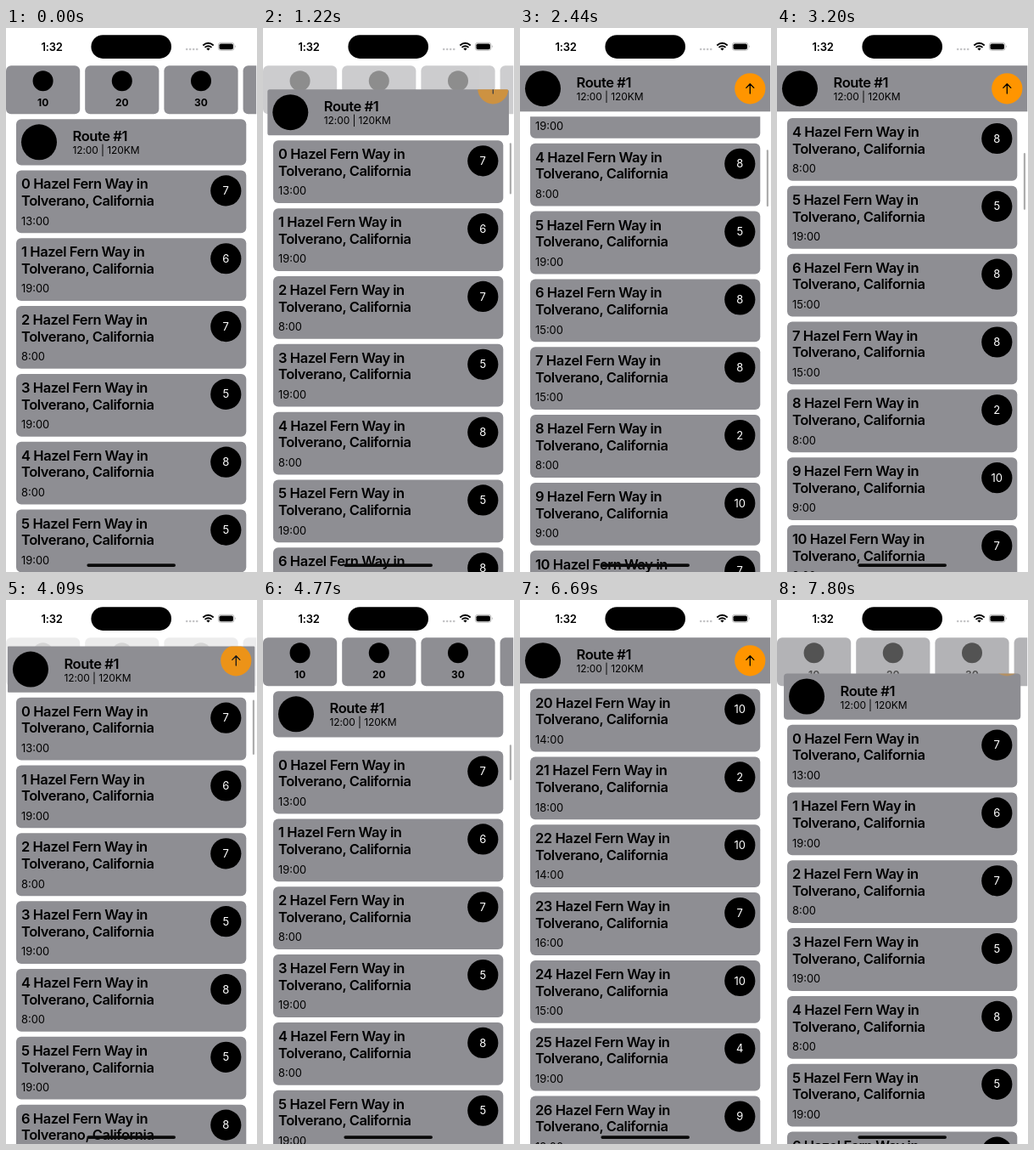
These frames come from a looping animation (296 by 640 pixels, 7890 ms). An HTML page:

```html
<!DOCTYPE html>
<html lang="en">
<head>
<meta charset="utf-8">
<style>
html, body { margin: 0; width: 100%; height: 100%; overflow: hidden; background: #fff; }
svg { display: block; font-family: Inter, "Liberation Sans", sans-serif; }
.card { fill: #8e8e93; }
.title { font-size: 16.5px; font-weight: 600; letter-spacing: -.42px; }
.time { font-size: 12.9px; }
.sub { font-size: 12px; letter-spacing: -.1px; }
.num { font-size: 13px; fill: #fff; text-anchor: middle; }
.tag { font-size: 12px; font-weight: 700; text-anchor: middle; }
</style>
</head>
<body>
<svg width="296" height="640" viewBox="0 0 296 640">
  <clipPath id="listClip"><rect y="104.3" width="296" height="536"/></clipPath>
  <clipPath id="headClip"><rect id="headMask" height="54.1"/></clipPath>

  <svg width="295.2" height="640"><g id="carousel"></g></svg>
  <g clip-path="url(#listClip)"><g id="list"></g></g>

  <rect id="headBox" class="card" height="54.1"/>
  <g id="headText">
    <circle cx="27" cy="27" r="21"/>
    <text class="title" x="66.5" y="26">Route #1</text>
    <text class="sub" x="66.5" y="41.2">12:00 | 120KM</text>
  </g>
  <g clip-path="url(#headClip)">
    <g id="button">
      <circle cx="271.3" cy="71.3" r="18.1" fill="#ff9500"/>
      <path d="M271.3 77V66M266.8 70.4L271.3 65.8L275.8 70.4" fill="none" stroke="#000" stroke-width="1.3" stroke-linecap="round" stroke-linejoin="round"/>
    </g>
  </g>
  <rect id="bar" x="290.8" width="2.2" rx="1.1" fill="#000" fill-opacity=".32"/>

  <!-- status bar and home indicator -->
  <text x="54" y="26.5" font-size="13" font-weight="600" text-anchor="middle" letter-spacing="-.2">1:32</text>
  <rect x="100.4" y="8.3" width="94.6" height="27.6" rx="13.8"/>
  <g fill="#c4c4c6" id="dots"></g>
  <g fill="none" stroke="#000" stroke-width="1.9">
    <path d="M232.3 20.4Q238.5 15.2 244.7 20.4M234.5 22.9Q238.5 19.5 242.5 22.9"/>
    <path d="M236.3 24.2Q238.5 22.6 240.7 24.2L238.5 26.6Z" fill="#000" stroke="none"/>
    <rect x="250.4" y="17.3" width="18.6" height="9" rx="2.8" stroke="#aaa" stroke-width=".8"/>
  </g>
  <rect x="251.5" y="18.4" width="16.4" height="6.8" rx="1.8"/>
  <path d="M270.2 20.3q1.6 1.5 0 3z" fill="#aaa"/>
  <rect x="95.4" y="630.2" width="104.6" height="3.8" rx="1.9" fill="#0a0a0a"/>
</svg>
<script>
const LOOP = 7890, PITCH = 79.83, TRAVEL = 63.1, HEAD_TOP = 107.3, LIST_TOP = 167.4;
const $ = id => document.getElementById(id);
const clamp = v => Math.min(1, Math.max(0, v));
const set = (el, attrs) => { for (const k in attrs) el.setAttribute(k, attrs[k]); };
const repeat = (n, make) => Array.from({ length: n }, (_, i) => make(i)).join('');

// the first stops are given, later ones are drawn at random
const firstBadges = [7, 6, 7, 5, 8, 5, 8, 8, 2, 10, 7];
const firstHours = [13, 19, 8, 19, 8, 19, 15, 15, 8, 9];
let seed = 7;
const random = (lo, hi) => {
  seed = seed * 16807 % 2147483647;
  return lo + Math.floor(seed / 2147483647 * (hi - lo + 1));
};

$('list').innerHTML = repeat(27, i => `<g transform="translate(0 ${LIST_TOP + i * PITCH})">
  <rect class="card" x="12" width="271.3" height="73.8" rx="6"/>
  <text class="title" x="18" y="22">${i} Hazel Fern Way in</text>
  <text class="title" x="18" y="41.7">Tolverano, California</text>
  <text class="time" x="18" y="64.2">${firstHours[i] ?? random(8, 20)}:00</text>
  <circle cx="259.3" cy="24" r="18.1"/>
  <text class="num" x="259.3" y="28.6">${firstBadges[i] ?? random(1, 10)}</text></g>`);

$('carousel').innerHTML = repeat(4, i => `<g transform="translate(${i * 93.2} 0)">
  <rect class="card" y="44.2" width="87.2" height="57.1" rx="6"/>
  <circle cx="43.6" cy="62.3" r="12"/>
  <text class="tag" x="43.6" y="92.2">${10 * (i + 1)}</text></g>`);

$('dots').innerHTML = repeat(4, i => `<circle cx="${213.2 + i * 4}" cy="25" r="1.3"/>`);

// eased share of a move; a bias below 1 starts it faster
function ease(t, from, to, bias = 1) {
  const u = clamp((t - from) / (to - from)) ** bias;
  return u * u * (3 - 2 * u);
}

// two drags with a bounce, then a jump down and back to the top
const scroll = t =>
  382.5 * ease(t, 1060, 2890, .69)
  - 410.5 * ease(t, 3150, 4465)
  + 28 * ease(t, 4465, 5120, .69)
  + 1659.4 * (ease(t, 5860, 6420) - ease(t, 7278, 7838));

const shown = (t, from, to) => clamp((t - from) / 60) * clamp((to - t) / 200);

function draw(t) {
  const s = scroll(t), p = clamp(s / TRAVEL);
  const inset = 12 * (1 - p), top = HEAD_TOP - TRAVEL * p;
  const box = { x: inset, y: top, width: 295.3 - 2 * inset, rx: 6 * (1 - p) };
  set($('list'), { transform: `translate(0 ${-s})` });
  set($('carousel'), { opacity: 1 - p });
  set($('headBox'), box);
  set($('headMask'), box);
  set($('headText'), { transform: `translate(${inset} ${top})` });
  set($('button'), { opacity: p });
  set($('bar'), {
    y: top + 63 + .125 * Math.max(0, s - TRAVEL),
    height: 52 + 15 * p + Math.min(0, s),
    opacity: shown(t, 1060, 5110) + shown(t, 5860, 6680)
  });
}

const start = performance.now();
function tick() {
  draw((performance.now() - start) % LOOP);
  requestAnimationFrame(tick);
}
tick();
</script>
</body>
</html>
```
